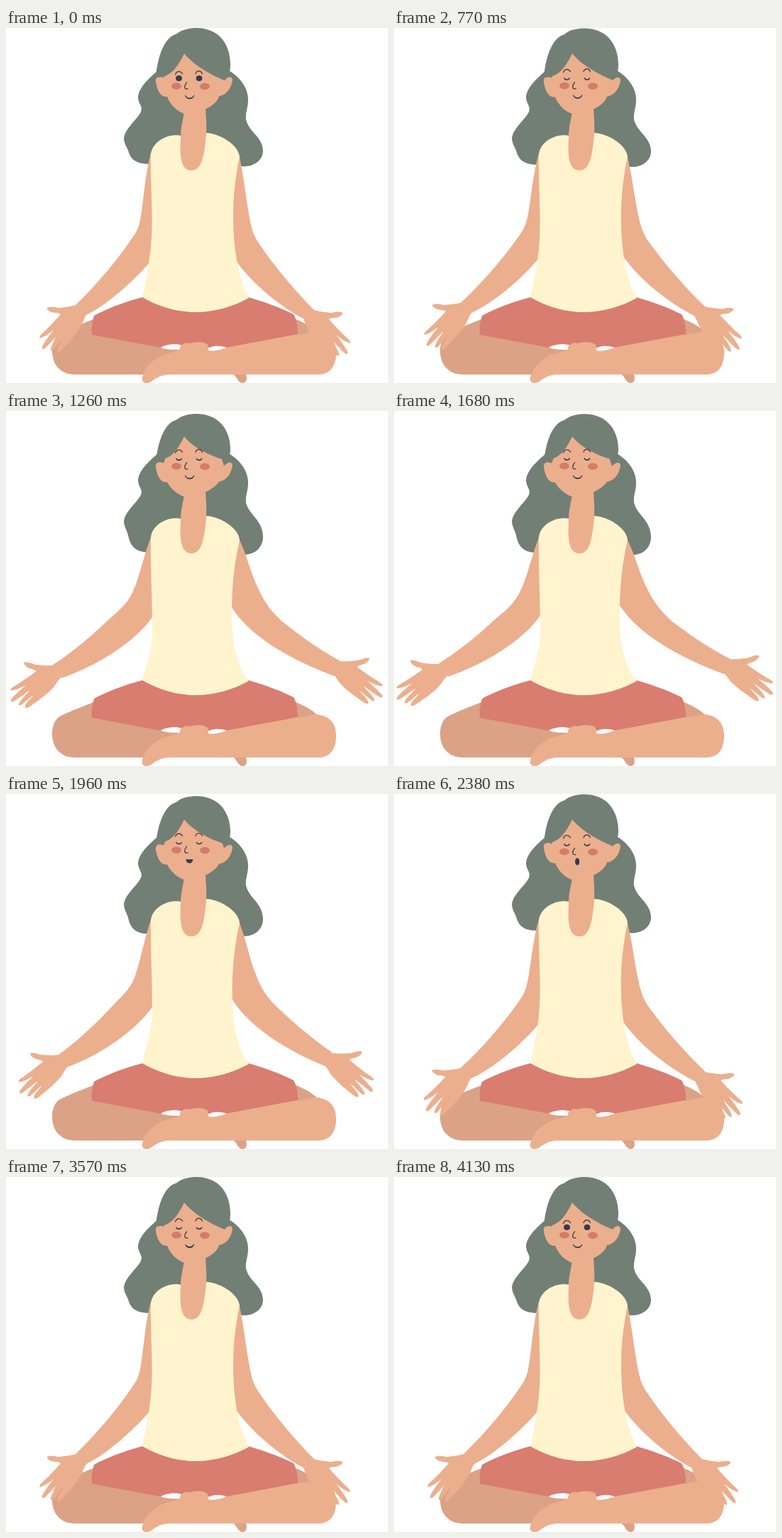
An HTML page that plays this animation: 538 by 501 pixels, repeating every 4.41 s.

```html
<!DOCTYPE html>
<html lang="en">
<head>
<meta charset="utf-8">
<title>Breathing exercise</title>
<style>
  html, body { margin: 0; width: 100%; height: 100%; overflow: hidden; background: #fff; }
  svg { display: block; width: 100%; height: 100%; }
  .skin { fill: #ebaf8e; }
  .shade { fill: #dba286; }
  .hair { fill: #727f75; }
  .shorts { fill: #d97d70; }
  .blush { fill: #d37c68; }
  .gap { fill: #fff; }
  .line { fill: none; stroke: #54423f; stroke-width: 1.4; stroke-linecap: round; }
  .ink { fill: #343b4c; stroke: #343b4c; stroke-width: 1.2; stroke-linejoin: round; }
</style>
</head>
<body>
<svg viewBox="0 0 538 501">
  <defs>
    <path id="hand" d="M-5,-7 C-15,-4 -23,-4 -29,-3 C-35,-4 -41,-5 -45,-3 C-46,-1 -43,1 -39,3
      C-34,5 -30,3 -26,6 C-33,14 -43,25 -53,34 C-57,38 -56,41 -53,39 C-47,37 -41,32 -36,28
      C-42,36 -49,45 -52,52 C-53,56 -50,56 -47,53 C-41,47 -34,39 -29,34
      C-33,42 -39,49 -40,55 C-41,59 -37,58 -35,55 C-30,49 -26,43 -22,39
      C-26,47 -31,52 -31,58 C-30,61 -27,59 -24,56 C-17,48 -7,38 0,27 C5,20 6,13 10,7Z"/>
  </defs>

  <path id="backHair" class="hair"/>

  <g id="legs">
    <path class="shade" d="M126,410 C105,418 82,427 73,433 C61,445 63,471 75,481 C82,488 90,489 100,489 L240,489 L262,456 L218,445Z"/>
    <path class="shade" d="M316,486 C326,490 325,500 333,501 C340,501 340,493 337,486Z"/>
    <path class="shade" d="M404,409 C420,416 432,422 438,429 L410,436Z"/>
    <path class="skin" d="M437,428 C455,430 465,440 465,458 C465,479 455,489 440,489 L230,489 C215,490 209,496 203,500 C195,503 190,499 192,493 C195,479 206,468 222,461 C234,457 242,456 248,452 L290,452 L400,425 L411,433Z"/>
    <path class="shorts" d="M192,380 C165,387 140,397 124,406 C121,415 120,425 121,433 L218,451 L310,451 L411,432 C411,420 408,408 405,404 C385,394 365,387 342,380Z"/>
    <path class="gap" d="M218,451 C225,446 241,445 248,448 L246,454 C236,454 226,454 218,451Z"/>
    <path class="gap" d="M284,455 C286,448 300,447 311,451 C303,453 296,457 284,455Z"/>
    <path class="skin" d="M244,460 C246,455 243,450 248,447 C251,444 255,444 259,445 C268,442 280,443 284,447 C286,452 282,454 290,459Z"/>
  </g>

  <path id="armL" class="skin"/>
  <path id="armR" class="skin"/>
  <use id="handL" href="#hand" class="skin"/>
  <use id="handR" href="#hand" class="skin"/>

  <path id="shirt" fill="#fff4ce"/>
  <path id="face" class="skin"/>
  <path class="skin" d="M252,112 C250,128 246,138 246,154 C244,186 248,201 261,201 C275,201 279,184 282,150 C283,135 281,122 281,108Z"/>
  <path id="fringe" class="hair"/>

  <g id="features">
    <ellipse class="blush" cx="240" cy="82" rx="7" ry="4.7"/>
    <ellipse class="blush" cx="280" cy="82.5" rx="7" ry="4.7"/>
    <path class="line" d="M254.500,77 C250.500,82 250.500,87 256,86"/>
    <path id="brows" class="line" d="M238.500,63.500 C240,59 245,57.500 248.500,62.500 M267,62.500 C269,57.500 274,57.500 276.500,62.500"/>
    <path id="eyes" class="ink"/>
    <path id="mouth" class="ink"/>
  </g>
</svg>
<script>
const STEP = 70, LOOP = 4410;

// [time, value] pairs
const LIFT = [[630, 0], [700, .03], [770, .11], [910, .36], [1190, .9], [1260, 1], [1400, 1.14], [1505, 1.18],
  [1610, 1.14], [1750, 1], [1960, .72], [2310, .2], [2380, .13], [2520, .05], [2870, 0]];
const LIDS = [[140, 0], [560, 1], [3780, 1], [4130, 0]];
const MOUTH = [[1750, 0], [1960, .45], [2310, 1], [2870, 1], [3430, .12], [3710, 0]];

const ARM_L = [
  "M204,176 C196,205 194,240 190,265 C188,278 186,285 178,296 C158,326 128,362 98,391 L111,406 C140,393 180,357 204,329 L215,250 L215,180Z",
  "M204,178 C192,210 187,240 176,260 C168,275 155,285 145,294 C120,318 98,337 65,359 L78,377 C130,359 185,324 208,288 L215,240 L215,180Z"];
const ARM_R = [
  "M328,178 C335,210 338,240 342,262 C345,282 349,293 355,302 C374,331 405,369 434,398 L422,412 C385,393 345,359 322,326 L310,250 L315,180Z",
  "M328,180 C340,205 345,230 355,250 C364,271 375,284 389,297 C415,318 445,339 471,353 L462,374 C400,351 340,316 316,274 L310,240 L315,180Z"];
const SHIRT = [
  "M250,153 C232,147 207,158 204,178 C203,210 207,260 205,295 C203,330 196,360 192,380 C215,393 240,401 267,401 C295,401 320,393 342,381 C328,355 320,315 320,265 C320,230 325,200 329,182 C328,165 300,148 281,148Z",
  "M250,153 C232,147 207,158 204,178 C203,210 206,260 206,315 C205,342 196,360 192,380 C215,393 240,401 267,401 C295,401 320,393 342,381 C321,355 318,320 318,275 C319,230 325,200 329,182 C328,165 300,148 281,148Z"];

const el = id => document.getElementById(id);
const draw = (id, d) => el(id).setAttribute("d", d);
const move = (id, v) => el(id).setAttribute("transform", v);
const lerp = (a, b, k) => a + (b - a) * k;

function track(keys, t) {
  if (t <= keys[0][0]) return keys[0][1];
  const i = keys.findIndex(k => k[0] > t);
  if (i < 0) return keys[keys.length - 1][1];
  const [t0, a] = keys[i - 1], [t1, b] = keys[i];
  return lerp(a, b, (t - t0) / (t1 - t0));
}

// Blend two paths of the same structure
function blend([from, to], k) {
  const ends = to.match(/[\d.]+/g);
  let i = 0;
  return from.replace(/[\d.]+/g, n => lerp(+n, +ends[i++], k).toFixed(2));
}

// Upper and lower curve between two corners; inset pulls the curves to a point
const lens = (l, r, y, up, down, inset) =>
  `M${l},${y} C${l + inset},${y + up} ${r - inset},${y + up} ${r},${y}
   C${r - inset},${y + down} ${l + inset},${y + down} ${l},${y}Z`;

function drawHead(p) {
  const top = 4 * p, ear = 3.5 * p, low = 7.5 * p;
  draw("backHair", `M214,60 C200,72 186,85 186,99 C187,108 193,111 190,118
    C186,128 167,142 166,156 C167,166 171,168 173,${176 + low / 2}
    C178,${190 + low} 190,${192 + low} 205,${192 + low} L331,${195 + low}
    C347,${197 + low} 362,${188 + low} 362,${173 + low / 2} C361,153 342,147 338,129
    C337,119 341,113 341,101 C341,84 329,69 314,60Z`);
  draw("face", `M240,25 L222,${70 + ear} C215,${67 + ear} 210,${69 + ear} 211,${76 + ear}
    C213,${90 + ear} 219,${98 + ear} 227,${97 + ear} C232,110 242,118 251,121 L282,114
    C290,110 298,104 300,${96 + ear} C311,${95 + ear} 318,${83 + ear} 319,${73 + ear}
    C318,${67 + ear} 312,${69 + ear} 307,${74 + ear} L290,25Z`);
  draw("fringe", `M251,36 C243,52 235,66 219,${69 - p} C215,70 213,69 211,${70 + ear}
    C213,${43 + top} 222,${13 + top} 240,${8.5 + top} C246,${3 + top} 256,${top} 268,${top}
    C301,${top} 316,${24 + top} 316,${52 + top / 2} C316,60 314,68 308,${74 - 5 * p}
    C285,${65 - 2 * p} 262,50 251,36Z`);
}

function drawFace(p, shut, open) {
  move("features", `translate(0 ${-4 * p})`);
  move("brows", `translate(0 ${2 - 2.5 * shut})`);
  const lid = lerp(-4.7, 2.9, shut), under = lerp(4.7, 3.4, shut);
  const eye = x => lens(x - 3.8, x + 3.8, 71, lid, under, shut);
  draw("eyes", eye(243.5) + eye(272));
  draw("mouth", lens(lerp(252.5, 255.7, open), lerp(264.7, 260.5, open), lerp(95.5, 96, open),
    lerp(4.8, -5.8, open), lerp(5.6, 5.8, open), lerp(2.5, 0, open)));
}

function drawArms(p) {
  draw("armL", blend(ARM_L, p));
  draw("armR", blend(ARM_R, p));
  draw("shirt", blend(SHIRT, p));
  move("handL", `translate(${103 - 34 * p} ${398 - 31 * p}) rotate(${12 * p})`);
  move("handR", `translate(${429 + 39 * p} ${405 - 44 * p}) rotate(${-12 * p}) scale(-1 1)`);
}

function frame() {
  const t = Math.floor(performance.now() % LOOP / STEP) * STEP;
  const p = track(LIFT, t);
  drawHead(p);
  drawArms(p);
  drawFace(p, track(LIDS, t), track(MOUTH, t));
  requestAnimationFrame(frame);
}
frame();
</script>
</body>
</html>
```
